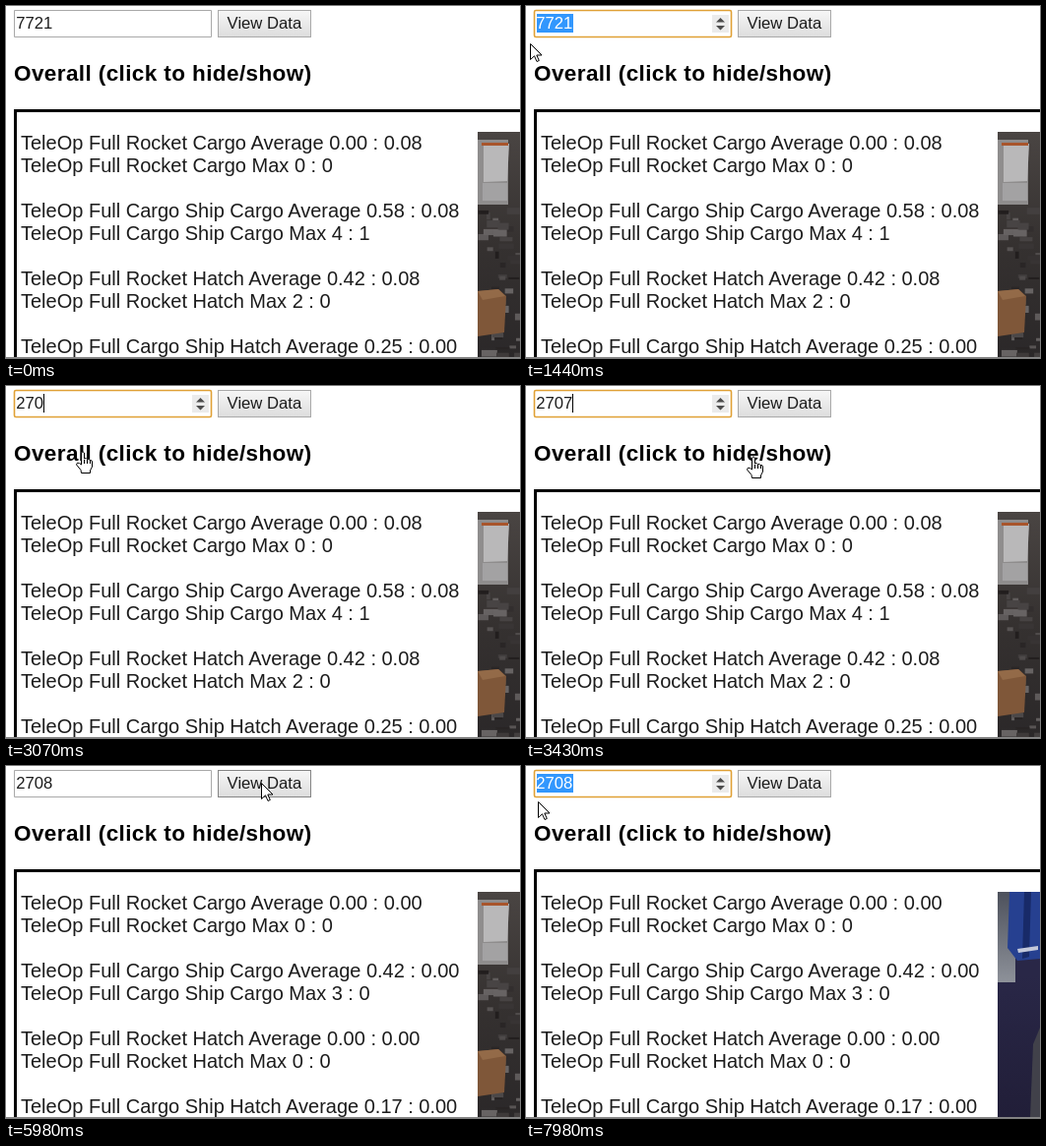
An HTML page with a canvas that plays this animation: 522 px wide and 358 px high, repeating every 8000 ms.

```html
<!DOCTYPE html>
<html lang="en">
<head>
<meta charset="utf-8">
<title>Team data lookup</title>
<style>
html, body { margin: 0; width: 100%; height: 100%; overflow: hidden; background: #fff; }
canvas { display: block; }
</style>
</head>
<body>
<canvas id="stage" width="522" height="358"></canvas>
<script>
const ctx = document.getElementById("stage").getContext("2d");
const LOOP = 8000;
const BLINK = 510;
const INK = "#1c1c1c";
const SANS = '"Liberation Sans", Arial, sans-serif';
const UI_FONT = "16.67px " + SANS;

const entry = { x: 446, y: 347, at: 240 };
const moves = [
  { from: 240, to: 1030, x: 141, y: 20 },
  { from: 1060, to: 1160, x: -20, y: 22 },
  { from: 1440, to: 1440, x: 4, y: 38 },
  { from: 1490, to: 1620, x: 17, y: 57 },
  { from: 1930, to: 2590, x: 77, y: 68 },
  { from: 3050, to: 3430, x: 231, y: 73 },
  { from: 3480, to: 3610, x: 259, y: 20 },
  { from: 3760, to: 4120, x: 259, y: 25 },
  { from: 4710, to: 4960, x: 262, y: 10 },
  { from: 5290, to: 5420, x: 259, y: 17 },
  { from: 7070, to: 7570, x: -30, y: 22 },
  { from: 7980, to: 7980, x: 12, y: 36 }
];

const actions = [
  [980, "focus"], [1120, "select"],
  [1620, "2"], [2330, "7"], [2840, "0"], [3250, "7"],
  [4090, "delete"], [4780, "8"],
  [5800, "blur"], [7360, "focus"], [7470, "select"]
];

const stats = [
  ["Rocket Cargo Average", "0.00 : 0.08", "0.00 : 0.00"],
  ["Rocket Cargo Max", "0 : 0", "0 : 0"],
  null,
  ["Cargo Ship Cargo Average", "0.58 : 0.08", "0.42 : 0.00"],
  ["Cargo Ship Cargo Max", "4 : 1", "3 : 0"],
  null,
  ["Rocket Hatch Average", "0.42 : 0.08", "0.00 : 0.00"],
  ["Rocket Hatch Max", "2 : 0", "0 : 0"],
  null,
  ["Cargo Ship Hatch Average", "0.25 : 0.00", "0.17 : 0.00"]
];

function rect(color, x, y, w, h) {
  ctx.fillStyle = color;
  ctx.fillRect(x, y, w, h);
}

function shape(d, fill, stroke) {
  const p = new Path2D(d);
  ctx.fillStyle = fill;
  ctx.fill(p);
  if (stroke) {
    ctx.strokeStyle = stroke;
    ctx.lineWidth = 1;
    ctx.stroke(p);
  }
}

function label(str, x, y, font, color = INK) {
  ctx.font = font;
  ctx.fillStyle = color;
  ctx.fillText(str, x, y);
}

function fade(y0, y1, ...colors) {
  const g = ctx.createLinearGradient(0, y0, 0, y1);
  colors.forEach((c, i) => g.addColorStop(i / (colors.length - 1), c));
  return g;
}

function seeded(seed) {
  return () => (seed = seed * 16807 % 2147483647) / 2147483647;
}

function pointerAt(t) {
  let { x, y } = entry;
  for (const m of moves) {
    if (t < m.from) break;
    const k = Math.min(1, (t - m.from) / (m.to - m.from || 1));
    const e = m.from === m.to ? 1 : k * k * (3 - 2 * k);
    x += (m.x - x) * e;
    y += (m.y - y) * e;
  }
  return [Math.round(x), Math.round(y)];
}

function fieldAt(t) {
  const s = { value: "7721", focused: false, selected: false, since: 0 };
  for (const [at, act] of actions) {
    if (at > t) break;
    if (act === "delete") {
      s.value = s.value.slice(0, -1);
    } else if (act === "select") {
      s.selected = true;
    } else if (act === "focus" || act === "blur") {
      s.focused = act === "focus";
      s.since = at;
    } else {
      s.value = (s.selected ? "" : s.value) + act;
      s.selected = false;
      s.since = at;
    }
  }
  s.caret = s.focused && !s.selected && Math.floor((t - s.since) / BLINK) % 2 === 0;
  return s;
}

const within = (x, y, left, right) => x >= left && x < right && y >= 4 && y < 32;
const inField = (x, y) => within(x, y, 8, 209);
const inButton = (x, y) => within(x, y, 215, 310);

function drawField({ value, focused, selected, caret }, hover) {
  ctx.strokeStyle = focused ? "#e0a136" : "#a9a9a9";
  ctx.lineWidth = focused ? 1.6 : 1;
  ctx.beginPath();
  ctx.roundRect(8.5, 4.5, 200, 27, focused ? 1.5 : 0);
  ctx.stroke();

  if (focused || hover) {
    rect("#ebebeb", 189, 9, 17, 18);
    shape("M193 16.5 L197.5 12 L202 16.5Z M193 20 L197.5 24.5 L202 20Z", "#4c4c4c");
  }
  ctx.font = UI_FONT;
  const w = ctx.measureText(value).width;
  if (selected) rect("#3297fd", 11, 8, Math.round(w), 19);
  label(value, 10.2, 23, UI_FONT, selected ? "#fff" : INK);
  if (caret) rect("#000", Math.round(10.4 + w), 8, 1, 19);
}

function drawButton(hover, pressed) {
  rect(pressed ? fade(5, 31, "#d8d8d8", "#e8e8e8") : fade(5, 31, "#f6f6f6", "#dddddd"), 215, 4, 95, 28);
  ctx.strokeStyle = hover ? "#858585" : "#a9a9a9";
  ctx.lineWidth = 1;
  ctx.strokeRect(215.5, 4.5, 94, 27);
  label("View Data", 224.6, 23, UI_FONT);
}

function workshopPhoto() {
  rect(fade(0, 229, "#4a4543", "#353130", "#2b2829"), 0, 0, 43, 229);
  const rnd = seeded(11);
  for (let i = 0; i < 40; i++) {
    const v = 30 + rnd() * 75;
    rect(`rgb(${v + 4},${v},${v})`, rnd() * 40, 75 + rnd() * 150, 3 + rnd() * 13, 2 + rnd() * 6);
  }
  rect("#8f8d8d", 0, 8, 31, 66);
  shape("M6 14 L32 12 L30 50 L6 51Z", "#b9b8b9");
  rect("#a3a2a3", 5, 52, 25, 18);
  rect("#a8552c", 4, 11, 27, 3);
  shape("M0 162 L21 160 L29 167 L27 204 L0 208Z", "#7f5739");
  shape("M0 162 L21 160 L28 167 L5 171Z", "#936a48");
}

function jerseyPhoto() {
  rect(fade(85, 229, "#292747", "#211e38"), 0, 0, 43, 229);
  rect(fade(0, 93, "#4d515c", "#8e929a"), 0, 0, 18, 92);
  shape("M12 0 H43 V68 L20 70 L10 57Z", "#264090");
  shape("M27 0 H34 L32 66 L25 68Z", "#182a68");
  shape("M20 58 L41 55 V59 L21 62Z", "#c3c8da");
  shape("M43 138 L36 155 L33 229 H43Z", "#41414a");
}

function drawPhoto(paint) {
  ctx.save();
  ctx.translate(479, 128);
  paint();
  ctx.restore();
}

const HAND = "M-1.5 12V0Q0-2.5 1.5 0V6Q3.5 4.5 4.3 6.5Q6.3 5.5 7 7.5Q9.5 7 9.5 9V14" +
  "L7.5 18V20.5H-1.5L-2 17.5L-6.5 12Q-6 9-3.5 10.5Z";
const ARROW = "M.5.5V16.5L4.5 12.8L7 18.5L9.3 17.5L6.8 12H12Z";

function drawPointer(x, y, dragging) {
  const overText = x < 462 && y > 128;
  ctx.save();
  ctx.translate(x, y);
  if (dragging || inField(x, y) || overText) {
    rect("#222", -0.5, -8, 1, 16);
    for (const edge of [-9, 8]) rect("#222", -3, edge, 6, 1);
  } else if (y >= 55 && y <= 82) {
    shape(HAND, "#fff", "#000");
    for (const finger of [1, 4, 7]) rect("#000", finger, 7, 1, 4);
  } else {
    shape(ARROW, "#fff", "#000");
  }
  ctx.restore();
}

function draw(now) {
  const t = now % LOOP;
  const [x, y] = pointerAt(t);
  const field = fieldAt(t);
  rect("#fff", 0, 0, 522, 358);
  drawField(field, inField(x, y));
  drawButton(inButton(x, y), t >= 5800 && t < 5900);
  ctx.letterSpacing = "0.4px";
  label("Overall (click to hide/show)", 8, 76, "bold 22.5px " + SANS, "#000");
  ctx.letterSpacing = "0px";

  rect("#000", 8, 105, 514, 3);
  rect("#000", 8, 105, 3, 253);
  const column = t < 5940 ? 1 : 2;
  stats.forEach((row, i) => {
    if (row) label(`TeleOp Full ${row[0]} ${row[column]}`, 15, 146 + i * 23, "20px " + SANS);
  });
  drawPhoto(t < 6060 ? workshopPhoto : jerseyPhoto);
  rect("#858585", 0, 357, 522, 1);
  if (t >= entry.at) drawPointer(x, y, field.selected && x < 8 && y < 32);
}

ctx.fontKerning = "normal";
const start = performance.now();
function tick() {
  draw(performance.now() - start);
  requestAnimationFrame(tick);
}
tick();
</script>
</body>
</html>
```
